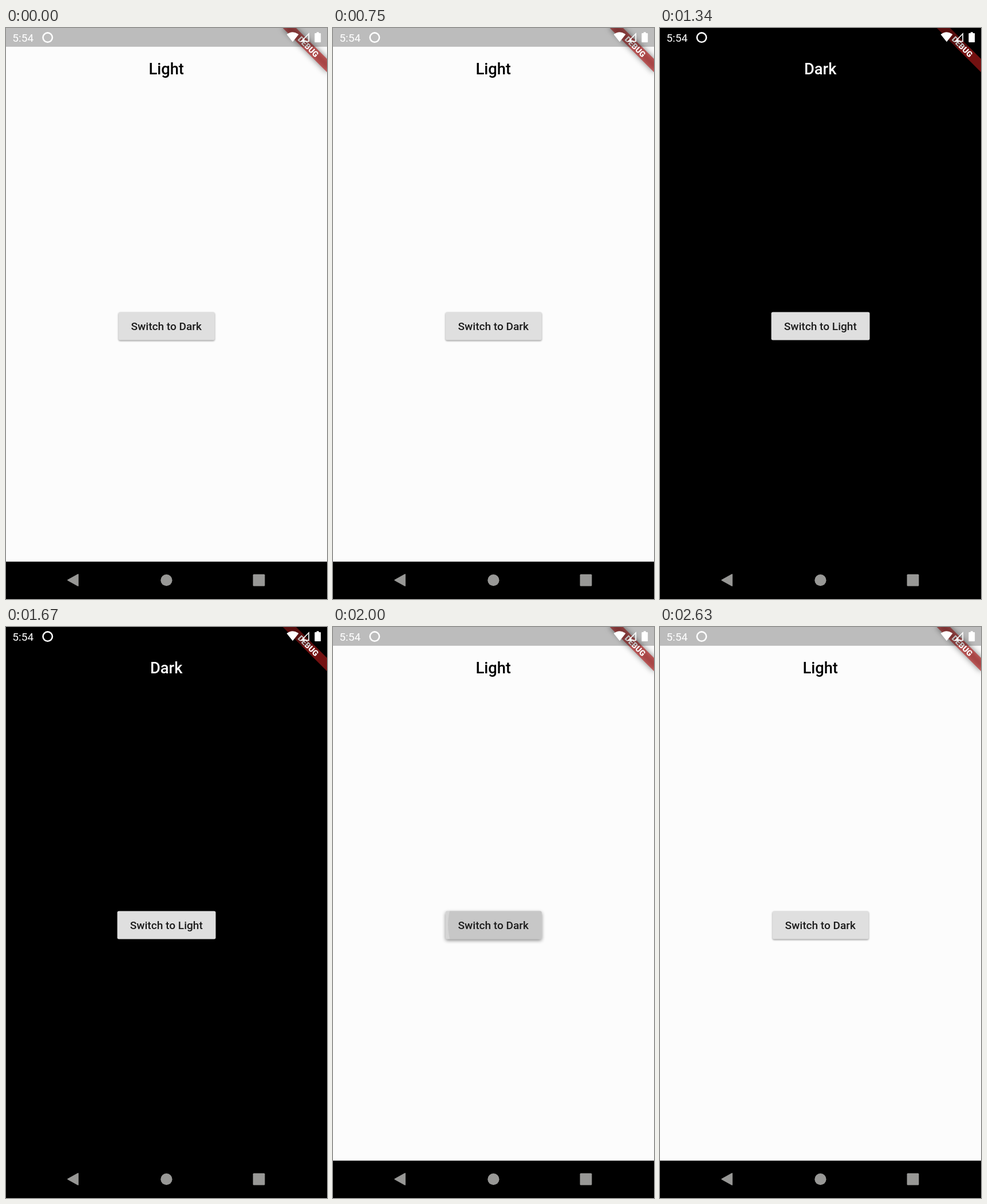
Write an HTML page that moves like this. It is 561 px wide and 998 px high and loops after 2.71 s.

```html
<!DOCTYPE html>
<html lang="en">
<head>
<meta charset="utf-8">
<title>Theme switch</title>
<style>
  html, body { margin: 0; width: 100%; height: 100%; overflow: hidden; background: #000; }
  svg { display: block; width: 561px; height: 998px; }
  text { font-family: Roboto, sans-serif; }
  .mid { text-anchor: middle; font-weight: 500; }
</style>
</head>
<body>
<svg viewBox="0 0 561 998" xmlns="http://www.w3.org/2000/svg">
  <defs>
    <filter id="soft" x="-50%" y="-150%" width="200%" height="400%"><feGaussianBlur stdDeviation="5.2"/></filter>
    <filter id="lift" x="-20%" y="-50%" width="140%" height="200%"><feGaussianBlur id="blur" stdDeviation="1.6"/></filter>
    <clipPath id="clip"><rect id="clipBox" y="496.5" height="49" rx="2.7"/></clipPath>
  </defs>

  <rect width="561" height="998"/>
  <rect id="page" width="561" height="932.7" fill="#fcfcfc"/>
  <text id="title" class="mid" x="280.2" y="81" font-size="27.3"></text>

  <rect id="shadow" y="496.5" height="49" rx="2.7" filter="url(#lift)"/>
  <rect id="button" y="496.5" height="49" rx="2.7" fill="#dfdfdf"/>
  <g clip-path="url(#clip)">
    <rect id="press" x="190" y="490" width="180" height="60" fill="#bcbcbc"/>
    <circle id="ripple" cx="301" cy="520.5" fill="#b4b4b2"/>
  </g>
  <text id="label" class="mid" x="280.3" y="527.5" font-size="19.1" fill="#1c1c1c"></text>

  <g transform="translate(561 0) rotate(45)">
    <rect x="-54.6" y="38.2" width="109.2" height="16.4" fill-opacity=".5" filter="url(#soft)"/>
    <rect x="-54.6" y="38.2" width="109.2" height="16.4" fill="#b71c1c" fill-opacity=".627"/>
    <text x="0" y="51.3" font-size="13.9" font-weight="900" text-anchor="middle" fill="#fff">DEBUG</text>
  </g>

  <rect width="561" height="32.8" fill-opacity=".255"/>
  <g fill="#fff">
    <text x="11.3" y="23.8" font-size="19.1">5:54</text>
    <circle cx="72.8" cy="16.6" r="8.2" fill="none" stroke="#fff" stroke-width="2.6"/>
    <path d="M490.6 11.2Q501 3.4 511.4 11.2L501 24.2Z"/>
    <path d="M529.2 10V23.3H516.2Z" fill="none" stroke="#fff" stroke-width="1.7"/>
    <path d="M514.6 24.1L521.5 17V24.1Z"/>
    <path d="M542.8 7.2h4v1.7h2.4q1 0 1 1v14q0 1-1 1h-8.8q-1 0-1-1v-14q0-1 1-1h2.4z"/>
  </g>

  <g fill="#989896">
    <path d="M108 965L126 955V975Z" stroke="#989896" stroke-width="1.6" stroke-linejoin="round"/>
    <circle cx="280.4" cy="965.2" r="10.1"/>
    <rect x="431.6" y="954.8" width="20.8" height="20.8" rx="1.5"/>
  </g>
</svg>
<script>
  const LOOP = 2710, TO_DARK = 1340, TO_LIGHT = 2000;
  const $ = id => document.getElementById(id);
  const ramp = (t, a, b) => Math.min(1, Math.max(0, (t - a) / (b - a)));
  const set = (id, attrs) => {
    for (const k in attrs) $(id).setAttribute(k, attrs[k]);
  };

  function draw(t) {
    const dark = t >= TO_DARK && t < TO_LIGHT;
    const box = dark ? { x: 194.5, width: 172 } : { x: 196.7, width: 168 };
    const fade = 1 - ramp(t, 2085, 2215);
    const press = ramp(t, 1840, 1955) * fade;

    set('page', { visibility: dark ? 'hidden' : 'visible' });
    set('title', { fill: dark ? '#fff' : '#000' });
    $('title').textContent = dark ? 'Dark' : 'Light';
    $('label').textContent = 'Switch to ' + (dark ? 'Light' : 'Dark');
    ['shadow', 'button', 'clipBox'].forEach(id => set(id, box));

    // The held press grows slowly; release makes the ripple fill the button.
    const radius = t < TO_LIGHT ? 6 * ramp(t, 1890, 1955) : 100 + 12 * ramp(t, 2085, 2120);
    set('press', { opacity: 0.3 * press });
    set('ripple', { r: radius, opacity: 0.42 * fade });

    const lift = dark ? 0 : press;
    set('shadow', { transform: `translate(0 ${1.4 + 1.1 * lift})`, opacity: 0.38 + 0.07 * lift });
    set('blur', { stdDeviation: 1.6 + 1.4 * lift });
  }

  const start = performance.now();
  function tick() {
    draw((performance.now() - start) % LOOP);
    requestAnimationFrame(tick);
  }
  tick();
</script>
</body>
</html>
```
